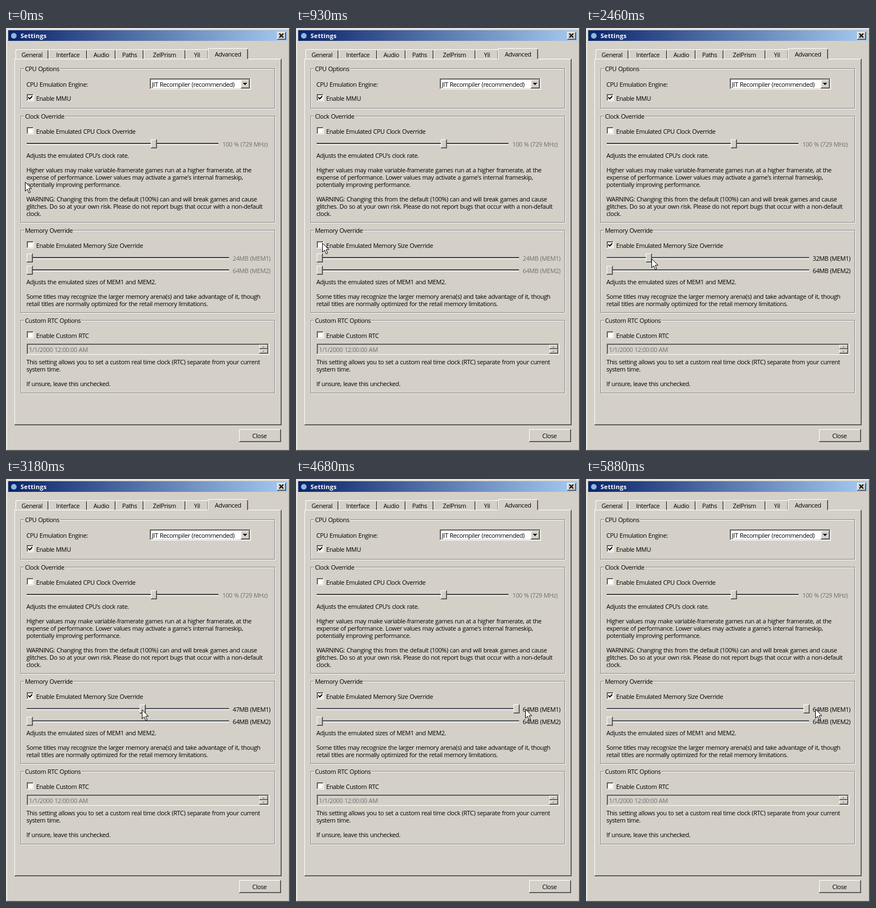
Recreate the animation shown at these times as an HTML page. Size 508 by 756 pixels, loop 5.91 s.

```html
<!DOCTYPE html>
<html lang="en">
<head>
<meta charset="utf-8">
<title>Settings</title>
<style>
html, body { margin: 0; width: 100%; height: 100%; overflow: hidden; background: #d4d0c8; }
svg { display: block; width: 508px; height: 756px; }
text {
  font: 11px "Open Sans", "Noto Sans", sans-serif;
  letter-spacing: -.4px; word-spacing: .6px; white-space: pre; fill: #000;
}
.bold { font-weight: 700; letter-spacing: .3px; fill: #fff; }
.off { fill: #707070; }
.mid { text-anchor: middle; }
.on { visibility: hidden; }
.active .on { visibility: visible; }
.active .memory { fill: #000; }
.channel { fill: #101010; }
.active .channel.live { fill: #283448; }
</style>
</head>
<body>
<svg id="stage" viewBox="0 0 508 756">
  <defs>
    <linearGradient id="bar"><stop stop-color="#0a246a"/><stop offset="1" stop-color="#a6caf0"/></linearGradient>
  </defs>
</svg>
<script>
const FACE = '#d4d0c8', LIGHT = '#fff', SHADE = '#808080', DARK = '#404040';
const stage = document.getElementById('stage');

const rect = (x, y, w, h, fill, extra = '') =>
  `<rect x="${x}" y="${y}" width="${w}" height="${h}" fill="${fill}" ${extra}/>`;
const line = (d, color) => `<path d="${d}" fill="none" stroke="${color}"/>`;
const text = (x, y, s, cls = '', id = '') => `<text x="${x}" y="${y}" class="${cls}" id="${id}">${s}</text>`;
const lines = (y, ...rows) => rows.map((s, i) => text(36.5, y + 13 * i, s)).join('');

// One-pixel border: first colour on top and left, second on bottom and right
const edge = (x, y, w, h, a, b) =>
  line(`M${x + .5} ${y + h - 1}V${y + .5}H${x + w - 1}`, a) +
  line(`M${x} ${y + h - .5}H${x + w - .5}V${y}`, b);
const raised = (x, y, w, h) => rect(x, y, w, h, FACE) +
  edge(x, y, w, h, LIGHT, DARK) + line(`M${x + 1} ${y + h - 1.5}H${x + w - 1.5}V${y + 1}`, SHADE);
const sunken = (x, y, w, h, fill) => rect(x, y, w, h, fill) +
  edge(x, y, w, h, SHADE, LIGHT) + edge(x + 1, y + 1, w - 2, h - 2, DARK, FACE);
const arrow = (x, y, r, dir = 1) => `<path d="M${x - r} ${y}h${2 * r}l${-r} ${r * dir}z"/>`;

const group = (y, h, title, gap) =>
  edge(27, y + 1, 455, h, LIGHT, LIGHT) + edge(26, y, 455, h, SHADE, SHADE) +
  rect(32, y - 1, gap, 4, FACE) + text(34, y + 5, title);

const check = (y, label, tick = '') => sunken(37, y, 13, 13, LIGHT) +
  (tick && `<path class="${tick}" d="M40 ${y + 5}v3l2 2 5-5v-3l-5 5z"/>`) +
  text(54, y + 12, label);

// A slider's groove and handle share the same middle line
const track = (mid, w, cls = '') => rect(37, mid - 2, w, 1, SHADE) +
  rect(37, mid - 1, w, 1, '', `class="channel ${cls}"`) + rect(37, mid + 1, w, 1, LIGHT);
const thumb = (x, mid, id = '') => `<g id="${id}">${raised(x, mid - 8, 11, 16)}</g>`;

const tab = (x, w, label, sel = 0) => {
  const y = sel ? 36 : 38, r = x + w - .5;
  return rect(x, y, w, 56 - y, FACE) +
    line(`M${x + .5} ${sel ? 56 : 55}V${y + 2}L${x + 2} ${y + .5}H${r - 1}`, LIGHT) +
    line(`M${r - 1} 55V${y + 1.5}`, SHADE) + line(`M${r} 55V${y + 2}`, DARK) +
    text(x + w / 2, sel ? 51 : 52, label, 'mid');
};

stage.innerHTML += `<g shape-rendering="crispEdges">` +
  rect(0, 0, 508, 756, FACE) +
  edge(0, 0, 508, 756, FACE, DARK) + edge(1, 1, 506, 754, LIGHT, SHADE) +
  rect(4, 4, 500, 19, 'url(#bar)') +
  '<circle cx="14" cy="14" r="5" fill="#8fb8dc" shape-rendering="auto"/>' +
  text(26, 18, 'Settings', 'bold') + raised(485, 7, 16, 14) +
  '<path d="M489 10l7 7m0-7l-7 7" stroke="#000" stroke-width="2" shape-rendering="auto"/>' +

  raised(15, 55, 478, 655) +
  tab(17, 59, 'General') + tab(76, 69, 'Interface') + tab(145, 51, 'Audio') +
  tab(196, 50, 'Paths') + tab(246, 75, 'ZelPrism') + tab(321, 41, 'Yil') +
  rect(16, 55, 476, 1, LIGHT) + tab(361, 72, 'Advanced', 1) +

  group(72, 72, 'CPU Options', 65) +
  text(36.5, 105, 'CPU Emulation Engine:') +
  sunken(257, 90, 181, 20, LIGHT) + text(261, 105, 'JIT Recompiler (recommended)') +
  raised(420, 92, 16, 16) + arrow(427.5, 98, 4) +
  check(118, 'Enable MMU', 'tick') +

  group(157, 191, 'Clock Override', 74) +
  check(177, 'Enable Emulated CPU Clock Override') +
  track(207, 343) + thumb(259, 207) + text(387, 212, '100 % (729 MHz)', 'off') +
  lines(232, 'Adjusts the emulated CPU\'s clock rate.') +
  lines(258, 'Higher values may make variable-framerate games run at a higher framerate, at the',
    'expense of performance. Lower values may activate a game\'s internal frameskip,',
    'potentially improving performance.') +
  lines(310, 'WARNING: Changing this from the default (100%) can and will break games and cause',
    'glitches. Do so at your own risk. Please do not report bugs that occur with a non-default',
    'clock.') +

  group(361, 148, 'Memory Override', 88) +
  check(381, 'Enable Emulated Memory Size Override', 'on') +
  track(411, 362, 'live') + thumb(37, 411, 'thumb') + text(405.5, 416, '', 'off memory', 'size') +
  track(433, 362, 'live') + thumb(37, 433) + text(405.5, 438, '64MB (MEM2)', 'off memory') +
  lines(458, 'Adjusts the emulated sizes of MEM1 and MEM2.') +
  lines(484, 'Some titles may recognize the larger memory arena(s) and take advantage of it, though',
    'retail titles are normally optimized for the retail memory limitations.') +

  group(522, 131, 'Custom RTC Options', 103) +
  check(542, 'Enable Custom RTC') +
  sunken(37, 564, 434, 20, FACE) + text(41, 579, '1/1/2000 12:00:00 AM', 'off') +
  raised(453, 566, 16, 8) + raised(453, 574, 16, 8) +
  `<g fill="${SHADE}">${arrow(460.5, 571, 2, -1)}${arrow(460.5, 577, 2)}</g>` +
  lines(601, 'This setting allows you to set a custom real time clock (RTC) separate from your current',
    'system time.') +
  lines(640, 'If unsure, leave this unchecked.') +

  raised(417, 717, 75, 23) + text(453.5, 733, 'Close', 'mid') + '</g>' +
  '<path id="cursor" d="M.5 .5V16.5L4.2 13 7 19.8 9.6 18.7 6.8 12H11.8Z" fill="#fff" stroke="#000"/>';

const [cursor, knob, size] = ['cursor', 'thumb', 'size'].map(id => document.getElementById(id));

// Pointer path: time, x, y
const path = [
  [0, 34, 275], [150, 34, 276], [840, 47, 384], [1260, 47, 384], [1590, 44, 410], [1860, 44, 411],
  [2460, 117, 412], [3180, 243, 412], [3660, 329, 412], [4140, 411, 411], [4200, 410, 411], [5910, 410, 411]
];

function pointer(t) {
  const i = path.findIndex(p => p[0] > t), a = path[i - 1], b = path[i];
  let u = (t - a[0]) / (b[0] - a[0]);
  if (t < 1860) u = u * u * (3 - 2 * u);
  return [1, 2].map(k => Math.round(a[k] + (b[k] - a[k]) * u));
}

function draw() {
  const t = Math.floor(performance.now() % 5910 / 30) * 30;
  const [x, y] = pointer(t);
  const steps = t < 1860 ? 0 : Math.max(0, Math.min(40, Math.round((x - 44) / 8.8)));
  stage.classList.toggle('active', t >= 1140);
  cursor.setAttribute('transform', `translate(${x} ${y})`);
  knob.setAttribute('transform', `translate(${Math.round(steps * 8.8)} 0)`);
  size.textContent = `${24 + steps}MB (MEM1)`;
  requestAnimationFrame(draw);
}
draw();
</script>
</body>
</html>
```
